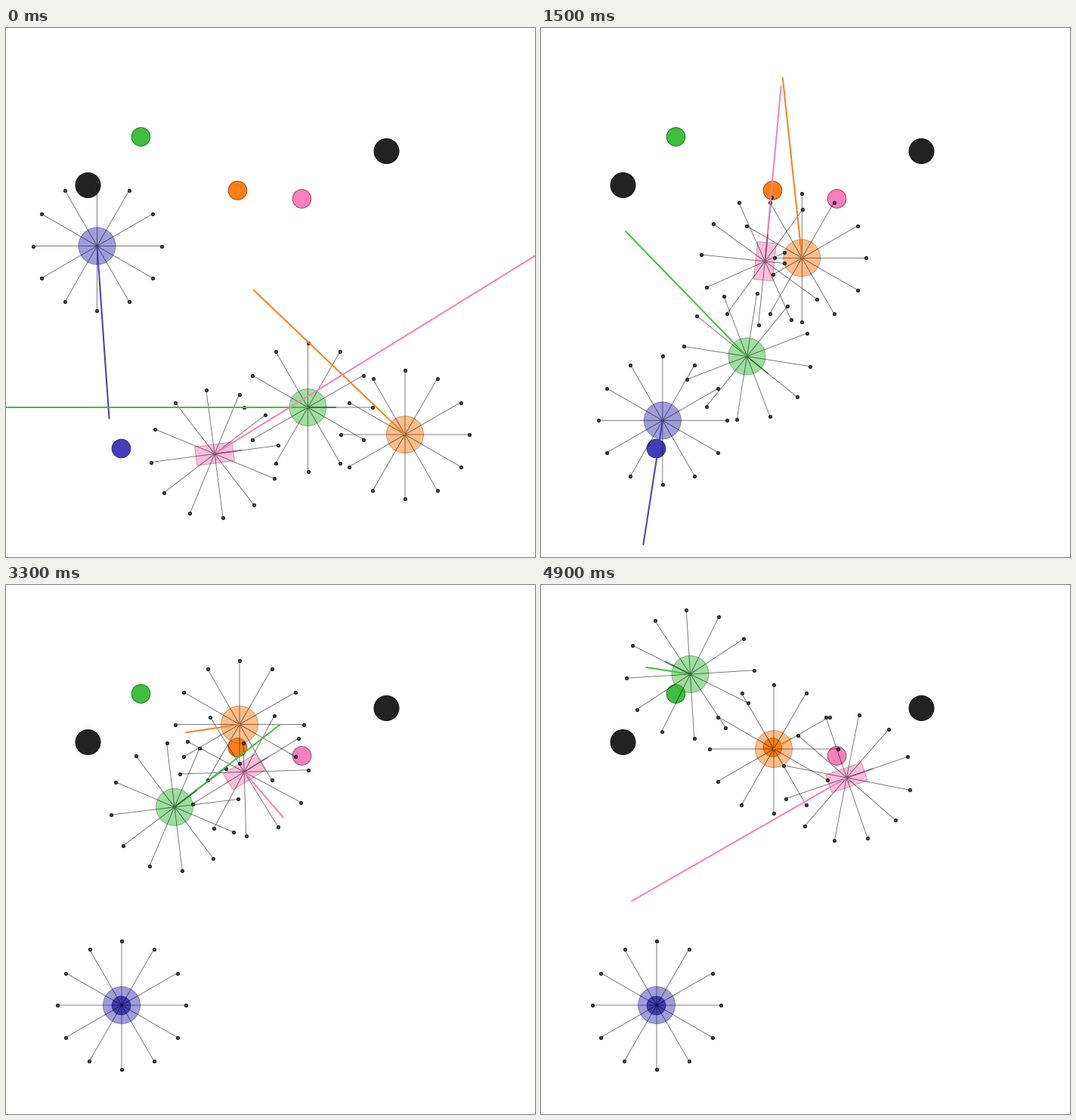
These frames come from a looping animation (700x700 px, 5 s). A matplotlib script:

```python
import numpy as np
import matplotlib.pyplot as plt
from matplotlib.animation import FuncAnimation
from matplotlib.colors import to_rgb
from matplotlib.patches import Circle, Polygon

SIZE, FRAMES, INTERVAL = 700, 50, 100
PX = 0.72                # points per pixel at 100 dpi
GAIN = 0.708             # speed per pixel of command vector
WHEEL_LIMIT = 160        # top speed on wheels, pixels per second
RAY, BODY, NOSE = 85, 24.5, 36
TIMES = np.array([0, 0.5, 1, 2, 2.8, 3.8, 4.9])
BLUE, GREEN, ORANGE, PINK = "#433dba", "#3fbf3f", "#ff7f14", "#f77fbc"

fig = plt.figure(figsize=(SIZE / 100, SIZE / 100), dpi=100, facecolor="white")
ax = fig.add_axes([0, 0, 1, 1])
ax.set_xlim(0.5, SIZE + 0.5)
ax.set_ylim(SIZE + 0.5, 0.5)
ax.axis("off")


def shade(color, factor):
    return tuple(factor * c for c in to_rgb(color))


def direction(degrees):
    a = np.radians(degrees)
    return np.stack([np.cos(a), -np.sin(a)], axis=-1)


def cross(a, b):
    return a[..., 0] * b[..., 1] - a[..., 1] * b[..., 0]


def disc(x, y, radius, color):
    ax.add_patch(Circle((x, y), radius, fc=color, ec=shade(color, 0.6),
                        lw=PX, zorder=1))


def line(color, width, zorder, **style):
    return ax.plot([], [], color=color, lw=width * PX, zorder=zorder,
                   **style)[0]


ROUND = BODY * direction(np.arange(0, 360, 6))
BOX = np.array([(25, 12.5), (25, -12.5), (-25, -12.5), (-25, 12.5)])


class Robot:
    """Follows key points (x, y, command dx, command dy[, heading]).

    With a heading it runs on wheels, otherwise it rolls freely.
    """

    def __init__(self, color, keys, shape=ROUND):
        keys = np.array(keys, float)
        self.times = TIMES[:len(keys)]
        self.path, self.command = keys[:, :2], keys[:, 2:4]
        self.wheels = keys.shape[1] == 5
        self.headings = keys[:, 4] if self.wheels else np.zeros(len(keys))
        self.shape = shape

        self.speed = GAIN * self.command
        if self.wheels:
            ahead = direction(self.headings)
            roll = np.sum(self.speed * ahead, axis=1, keepdims=True)
            self.speed = np.clip(roll, -WHEEL_LIMIT, WHEEL_LIMIT) * ahead
        self.speed[0] = 0

        self.body = ax.add_patch(Polygon(
            shape, fc=(*to_rgb(color), 0.5), ec=(*shade(color, 0.6), 0.45),
            lw=PX, zorder=2))
        self.rays = line("black", 0.85, 3, alpha=0.6)
        self.dots = line("#3a3a3a", 0, 3, marker="o", ms=4.4 * PX,
                         mec="#1c1c1c", mew=0.8 * PX, snap=False)
        self.arrow = line(color, 2, 4)
        self.nose = line(shade(color, 0.55), 1.5, 4)

    def move(self, t):
        t = min(t, self.times[-1])
        i = min(np.searchsorted(self.times, t, side="right"),
                len(self.times) - 1) - 1
        h = self.times[i + 1] - self.times[i]
        s = (t - self.times[i]) / h
        p, q = self.path[i:i + 2]
        m, n = h * self.speed[i:i + 2]
        self.pos = ((1 + 2 * s) * (1 - s) ** 2 * p + s * (1 - s) ** 2 * m
                    + s * s * (3 - 2 * s) * q + s * s * (s - 1) * n)
        self.angle = np.interp(t, self.times, self.headings)

        # Between keys the command bends towards the average pace.
        u, v = self.command[i:i + 2]
        pace = (q - p) / (GAIN * h)
        arrow = (1 - s) * u + s * v + 4 * s * (1 - s) * (pace - (u + v) / 2)

        ahead = direction(self.angle)
        side = np.array([-ahead[1], ahead[0]])
        self.outline = self.pos + self.shape @ np.array([ahead, side])
        self.body.set_xy(self.outline)
        self.arrow.set_data(*np.stack([self.pos, self.pos + arrow]).T)
        if self.wheels:
            self.nose.set_data(
                *np.stack([self.pos, self.pos + NOSE * ahead]).T)

    def sense(self, others):
        """Cast twelve rays that stop at the nearest other body."""
        rays = direction(self.angle + 30 * np.arange(12))
        reach = np.full(12, float(RAY))
        for other in others:
            edges = np.roll(other.outline, -1, axis=0) - other.outline
            gap = other.outline - self.pos
            with np.errstate(divide="ignore", invalid="ignore"):
                det = cross(rays[:, None], edges)
                dist = cross(gap, edges) / det
                along = cross(gap, rays[:, None]) / det
            hit = (dist > 0) & (along >= 0) & (along <= 1)
            reach = np.minimum(reach, np.where(hit, dist, RAY).min(axis=1))
        tips = self.pos + reach[:, None] * rays
        spokes = np.full((12, 3, 2), np.nan)
        spokes[:, 0], spokes[:, 1] = self.pos, tips
        self.rays.set_data(*spokes.reshape(-1, 2).T)
        self.dots.set_data(*tips.T)


for x, y in [(109, 208.5), (504, 163.5)]:
    disc(x, y, 16.5, "#222222")
for x, y, color in [(153, 557, BLUE), (179, 144.5, GREEN),
                    (307, 215.5, ORANGE), (392, 226.5, PINK)]:
    disc(x, y, 12.3, color)

robots = [
    Robot(BLUE, [(121, 289, 16, 228),
                 (140, 354.5, 119, 241),
                 (171.5, 440.5, -13, 241),
                 (153.5, 556.5, 0, 0)]),
    Robot(ORANGE, [(528.5, 538.5, -200, -191),
                   (467, 477, -227, -237),
                   (387, 392.5, -226, -241),
                   (369, 224, 138, -202),
                   (358.5, 175, -195, 206),
                   (308.5, 182.5, 76, 135),
                   (308.5, 217.5, 23, -14)]),
    Robot(GREEN, [(400, 502.5, -430, 0, 0),
                  (382, 503, -420, -66, -8.5),
                  (331.5, 486, -157, -104, -28),
                  (218, 369, -167, -165, -50),
                  (157.5, 319, 250, -18, -2),
                  (256, 242, -9, -160, 76),
                  (198, 118.5, -58, -9, 153.5)]),
    Robot(PINK, [(276.5, 564, 466, -288, 7.5),
                 (302, 493.5, -38, -232, 83),
                 (292, 409, 8, -268, 95.5),
                 (307, 245, -338, -134, 72.5),
                 (315.5, 222, -2, 83, 70.5),
                 (352, 264.5, 165, 130, -7),
                 (405, 255.5, -284, 163, 19)], BOX),
]


def draw(frame):
    for robot in robots:
        robot.move(frame * INTERVAL / 1000)
    for robot in robots:
        robot.sense([other for other in robots if other is not robot])
    return []


animation = FuncAnimation(fig, draw, frames=FRAMES, interval=INTERVAL,
                          repeat=True, repeat_delay=0)
plt.show()
```
